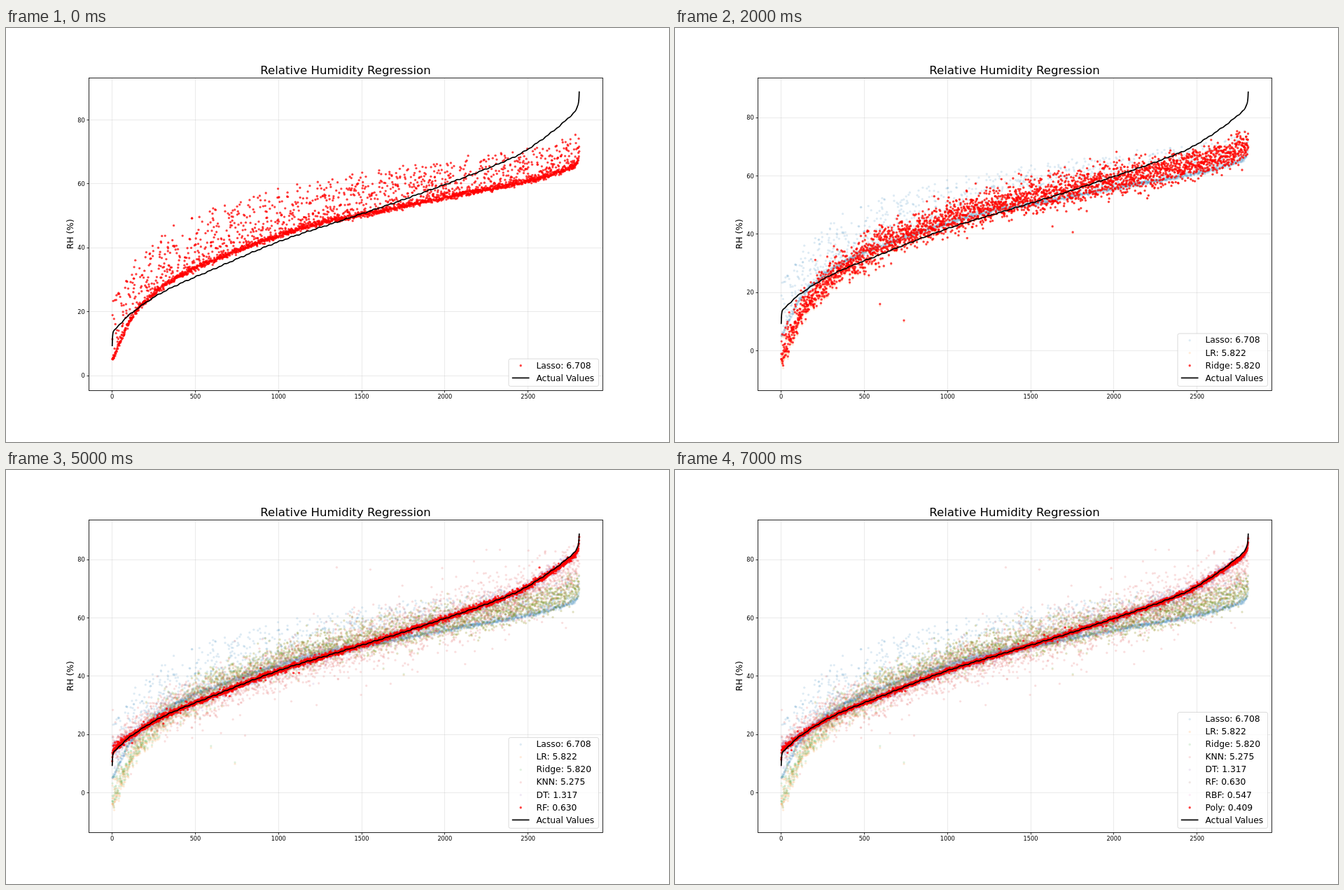
Recreate the animation shown at these times as an HTML page with a canvas. Size 947 by 592 pixels, loop 8000 ms.

```html
<!DOCTYPE html>
<html lang="en">
<head>
<meta charset="utf-8">
<title>Relative Humidity Regression</title>
<style>
html, body { margin: 0; width: 100%; height: 100%; overflow: hidden; background: #fff; }
canvas { display: block; }
</style>
</head>
<body>
<canvas id="stage" width="947" height="592"></canvas>
<script>
const ctx = document.getElementById('stage').getContext('2d');
const HOLD = 1000, LAST = 2808;
const BOX = { l: 118.5, t: 71.5, r: 852.5, b: 518.5 };
const FONT = '"DejaVu Sans", Verdana, sans-serif';
const { exp, min } = Math;

// Seeded random numbers
let seed = 20417;
function rnd() {
  seed = (seed + 0x6D2B79F5) | 0;
  let t = Math.imul(seed ^ (seed >>> 15), 1 | seed);
  t = (t + Math.imul(t ^ (t >>> 7), 61 | t)) ^ t;
  return ((t ^ (t >>> 14)) >>> 0) / 4294967296;
}
const gauss = () => Math.sqrt(-2 * Math.log(1 - rnd())) * Math.cos(2 * Math.PI * rnd());
const heavy = (odds, wide) => gauss() * (rnd() < odds ? wide : 1);

// Smooth curve through a few key points
function curve(...keys) {
  const slope = (a, b) => (b[1] - a[1]) / (b[0] - a[0]);
  const tangent = i => slope(keys[Math.max(i - 1, 0)], keys[min(i + 1, keys.length - 1)]);
  return x => {
    let i = 0;
    while (i < keys.length - 2 && x > keys[i + 1][0]) i++;
    const [x0, y0] = keys[i], [x1, y1] = keys[i + 1];
    const w = x1 - x0, u = (x - x0) / w, v = 1 - u;
    return v * v * ((1 + 2 * u) * y0 + u * w * tangent(i)) +
      u * u * ((1 + 2 * v) * y1 - v * w * tangent(i + 1));
  };
}

const trend = curve([0, 13.4], [100, 18.9], [300, 26], [600, 33.1], [1000, 41.9], [1400, 48.9],
  [1800, 56], [2400, 68], [2600, 74.5], [2780, 82.5], [LAST, 85.4]);
const actual = x => trend(x) - 4.2 * exp(-x / 2) + 3.4 * exp((x - LAST) / 2) +
  0.1 * Math.sin(x / 13) + 0.08 * Math.sin(x / 5.3);
const floor = curve([0, 4.5], [100, 16], [200, 23.1], [400, 30.8], [800, 39.7], [1200, 46.8],
  [1500, 50], [2000, 55.5], [2500, 60.7], [2780, 65.3], [LAST, 68]);

const indices = Array.from({ length: LAST + 1 }, (_, x) => x);
const part = x => x / LAST;

// Upward scatter shared by the linear models
const tails = indices.map(x => rnd() < 0.54 ? (18 - 9 * part(x)) * rnd() ** 2.1 : 0);
const lasso = indices.map(x => floor(x) + 0.4 * gauss() + 0.5 * rnd() + tails[x]);

const shift = x => 1.5 - 10.5 * exp(-x / 450) + 2.5 * part(x) ** 4;
const lr = indices.map(x => floor(x) + shift(x) + 0.45 * tails[x] +
  gauss() * (2.5 - 1.2 * exp(-x / 200)));
for (const [x, v] of [[594, 15.4], [738, 9.9], [1631, 42.4], [1753, 40.4]]) lr[x] = v;
const ridge = lr.map(v => v + 0.8 - 0.013 * v + 0.05 * gauss());

const knn = indices.map(x => min(85 - 3 * rnd(),
  actual(x) + 0.6 + 2 * exp(-x / 80) - 6.5 * part(x) ** 8 +
  heavy(0.1, 2) * (4.2 - 2.2 * exp(-x / 500))));
knn[1350] = 77.3;

// Models that follow the actual values closely
const close = (scale, odds, wide) => indices.map(x =>
  actual(x) + 1.5 * exp(-x / 40) - 1.2 * part(x) ** 20 +
  heavy(odds, wide) * scale * (0.45 + 0.35 * exp(-x / 80)));

const models = [
  ['Lasso: 6.708', lasso, '31,119,180'],
  ['LR: 5.822', lr, '255,127,14'],
  ['Ridge: 5.820', ridge, '44,160,44'],
  ['KNN: 5.275', knn, '214,39,40'],
  ['DT: 1.317', close(1.7, 0.1, 3), '148,103,189'],
  ['RF: 0.630', close(1, 0.03, 3), '140,86,75'],
  ['RBF: 0.547', close(0.95, 0.03, 2.5), '227,119,194'],
  ['Poly: 0.409', close(0.75, 0.04, 2.8), '188,189,34']
];

const px = x => 151.7 + x * 0.23757;
const snap = v => Math.floor(v) + 0.5;

function line(x1, y1, x2, y2, color, width) {
  ctx.strokeStyle = color;
  ctx.lineWidth = width;
  ctx.beginPath();
  ctx.moveTo(x1, y1);
  ctx.lineTo(x2, y2);
  ctx.stroke();
}
function dot(x, y) {
  ctx.beginPath();
  ctx.arc(x, y, 1.65, 0, 2 * Math.PI);
  ctx.fill();
}
function label(text, x, y, size, align) {
  ctx.font = `${size}px ${FONT}`;
  ctx.textAlign = align;
  ctx.fillStyle = '#000';
  ctx.fillText(text, x, y);
}
const tint = (i, last) => i === last ? 'rgba(255,0,0,0.75)' : `rgba(${models[i][2]},0.15)`;

function drawAxes(py) {
  const grid = 'rgba(176,176,176,0.3)';
  for (let v = 0; v <= 2500; v += 500) {
    const x = snap(px(v));
    line(x, BOX.t, x, BOX.b, grid, 0.9);
    line(x, BOX.b, x, BOX.b + 3, '#000', 0.8);
    label(v, px(v), 530.2, 8.22, 'center');
  }
  for (let v = 0; v <= 80; v += 20) {
    const y = snap(py(v));
    line(BOX.l, y, BOX.r, y, grid, 0.9);
    line(BOX.l - 3, y, BOX.l, y, '#000', 0.8);
    label(v, 112.7, py(v) + 3.1, 8.22, 'right');
  }
}

function drawLegend(last) {
  const height = (last + 2) * 18.1 + 3;
  ctx.beginPath();
  ctx.roundRect(718, 512.3 - height, 128.6, height, 2.5);
  ctx.fillStyle = 'rgba(255,255,255,0.8)';
  ctx.fill();
  ctx.strokeStyle = 'rgba(204,204,204,0.8)';
  ctx.lineWidth = 0.9;
  ctx.stroke();
  for (let i = 0; i <= last; i++) {
    const y = 500.4 - (last + 1 - i) * 18.05;
    ctx.fillStyle = tint(i, last);
    dot(735.2, y + 0.4);
    label(models[i][0], 757.4, y + 4.2, 12.33, 'left');
  }
  line(722.8, 500.4, 747.5, 500.4, '#000', 1.7);
  label('Actual Values', 757.4, 504.6, 12.33, 'left');
}

function draw(last) {
  const [zero, unit] = last === 0 ? [497.1, 4.57] : [461.6, 4.17];
  const py = v => zero - v * unit;
  ctx.fillStyle = '#fff';
  ctx.fillRect(0, 0, 947, 592);
  drawAxes(py);

  for (let i = 0; i <= last; i++) {
    ctx.fillStyle = tint(i, last);
    models[i][1].forEach((v, x) => dot(px(x), py(v)));
  }

  ctx.strokeStyle = '#000';
  ctx.lineWidth = 1.7;
  ctx.lineJoin = 'round';
  ctx.beginPath();
  for (const x of indices) ctx.lineTo(px(x), py(actual(x)));
  ctx.stroke();

  ctx.lineWidth = 0.85;
  ctx.lineJoin = 'miter';
  ctx.strokeRect(BOX.l, BOX.t, BOX.r - BOX.l, BOX.b - BOX.t);

  label('Relative Humidity Regression', 485, 66.2, 16.6, 'center');
  ctx.save();
  ctx.translate(96, 294.8);
  ctx.rotate(-Math.PI / 2);
  label('RH (%)', 0, 0, 12.33, 'center');
  ctx.restore();
  drawLegend(last);
}

let shown = -1;
const start = performance.now();
function tick() {
  const step = Math.floor((performance.now() - start) / HOLD) % models.length;
  if (step !== shown) draw(shown = step);
  requestAnimationFrame(tick);
}
tick();
</script>
</body>
</html>
```
